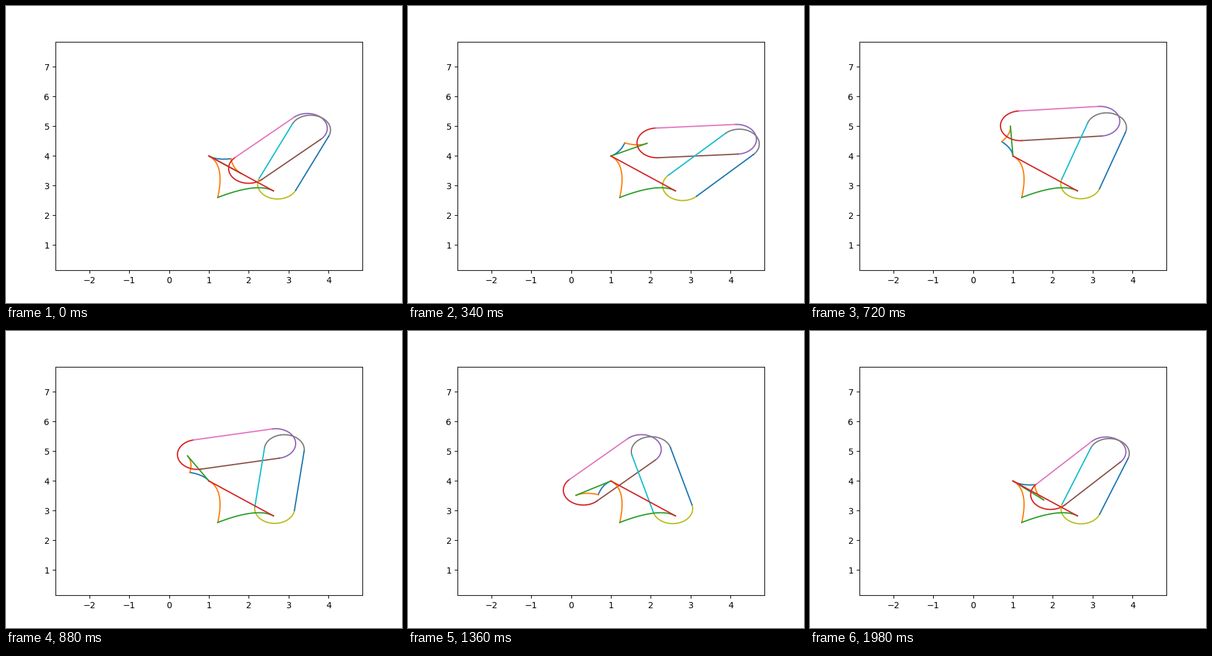
These frames come from a looping animation (640x480 px, 2 s). A matplotlib script:

```python
import numpy as np
import matplotlib.pyplot as plt
from matplotlib.animation import FuncAnimation

FRAMES = 100
CRANK, COUPLER, ROCKER, GROUND = 1.0, 2.5, 2.5, 2.0
BASE_ANGLE = -np.pi / 5
REACH = 1.1 * (CRANK + COUPLER)


def polar(length, angle):
    return length * np.array([np.cos(angle), np.sin(angle)])


def quad(p0, p1, p2):
    """Quadratic Bezier curve as a 2 x N array."""
    t = np.linspace(0, 1, 60)
    a, b, c = (np.array(p, float)[:, None] for p in (p0, p1, p2))
    return a * (1 - t) ** 2 + 2 * b * t * (1 - t) + c * t ** 2


def fin(length, peak):
    """Straight bar with two curves meeting at a peak beside its middle."""
    mid, end = (length / 2, peak), (length, 0)
    return [
        quad((0, 0), (length / 4, 0), mid),
        quad(mid, (3 * length / 4, 0), end),
        np.array([[length, 0], [0, 0]], float),
    ]


def slot(length, inset=0.25, radius=0.5):
    """Rounded bar: two end caps, then the right and left sides."""
    a = np.linspace(np.pi / 2, 3 * np.pi / 2, 100)
    cap = radius * np.array([np.cos(a), np.sin(a)])
    x0, x1 = inset, length - inset
    return [
        cap + [[x0], [0]],
        [[x1], [0]] - cap,
        np.array([[x0, x1], [-radius, -radius]]),
        np.array([[x0, x1], [radius, radius]]),
    ]


def place(shape, start, end):
    """Put a shape drawn along the x axis onto the line start-end."""
    dx, dy = (end - start) / np.hypot(*(end - start))
    turn = np.array([[dx, -dy], [dy, dx]])
    return [turn @ part + start[:, None] for part in shape]


pivot = np.array([1.0, 4.0])
anchor = pivot + polar(GROUND, BASE_ANGLE)

shapes = [fin(CRANK, 0.25), slot(COUPLER), slot(ROCKER), fin(GROUND, -1.0)]


def solve(angle):
    """Crank tip and coupler-rocker joint for a crank angle."""
    tip = pivot + polar(CRANK, angle)
    gap = anchor - tip
    d = np.hypot(*gap)
    along = (COUPLER ** 2 - ROCKER ** 2 + d ** 2) / (2 * d)
    height = np.sqrt(COUPLER ** 2 - along ** 2)
    unit = gap / d
    return tip, tip + along * unit + height * np.array([-unit[1], unit[0]])


fig, ax = plt.subplots(figsize=(6.4, 4.8), dpi=100)
ax.set_xlim(pivot[0] - REACH, pivot[0] + REACH)
ax.set_ylim(pivot[1] - REACH, pivot[1] + REACH)
lines = [ax.plot([], [])[0] for shape in shapes for _ in shape]


def update(i):
    tip, joint = solve(BASE_ANGLE + 2 * np.pi * i / FRAMES)
    ends = [(pivot, tip), (tip, joint), (joint, anchor), (pivot, anchor)]
    parts = [p for s, e in zip(shapes, ends) for p in place(s, *e)]
    for line, part in zip(lines, parts):
        line.set_data(*part)
    return lines


anim = FuncAnimation(fig, update, frames=FRAMES, interval=20, repeat=True)
plt.show()
```
